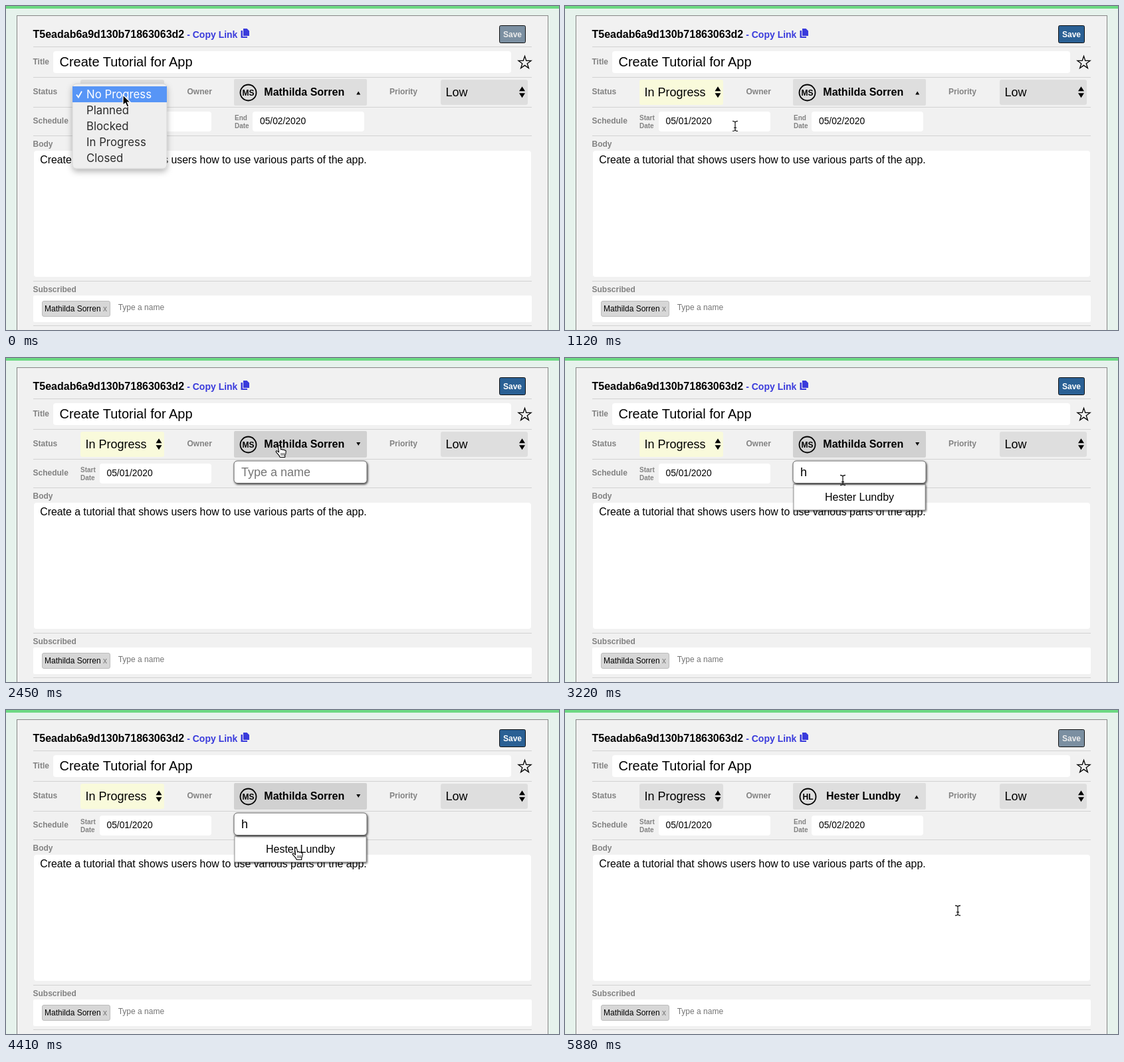
These frames come from a looping animation (832 by 488 pixels, 5950 ms). An HTML page:

```html
<!DOCTYPE html>
<html lang="en">
<head>
<meta charset="utf-8">
<title>Task form</title>
<style>
  html, body { margin: 0; width: 832px; height: 488px; overflow: hidden; }
  svg { display: block; font-family: "Liberation Sans", Arial, Helvetica, sans-serif; }
  text { white-space: pre; }
  .label { font-weight: bold; font-size: 12px; fill: #828282; }
  .small { font-weight: bold; font-size: 10px; fill: #828282; }
  .bold { font-weight: bold; }
  .hint { fill: #757575; }
  .menu text { font: 16.8px Inter, Roboto, sans-serif; }
</style>
</head>
<body>
<svg id="stage" width="832" height="488" viewBox="0 0 832 488"></svg>
<script>
const LOOP = 5950, STEP = 70;
const OLD_OWNER = "Mathilda Sorren", NEW_OWNER = "Hester Lundby";
const OPTIONS = ["No Progress", "Planned", "Blocked", "In Progress", "Closed"];
const GREY = "#dedede", HOVER = "#d1d1d1", EDITED = "#f9fadb";

// Moments at which the interface switches state
const AT = { pickStatus: 840, openOwner: 2240, type: 3080, pickOwner: 4480, saved: 5320 };

// Pointer stops: time, x, y
const PATH = [
  [70, 176, 134], [560, 169, 212], [910, 169, 212], [1400, 390, 133],
  [1680, 390, 133], [2030, 411, 132], [2520, 411, 132], [2800, 418, 184],
  [4080, 418, 184], [4340, 436, 208], [4500, 436, 208], [5040, 762, 41],
  [5670, 762, 41], [5880, 591, 302]
];

const rect = (x, y, w, h, fill, more = "") =>
  `<rect x="${x}" y="${y}" width="${w}" height="${h}" fill="${fill}" ${more}/>`;
const text = (x, y, size, str, more = "") =>
  `<text x="${x}" y="${y}" font-size="${size}" ${more}>${str}</text>`;
const label = (x, y, str, cls = "label") => `<text x="${x}" y="${y}" class="${cls}">${str}</text>`;
const path = (d, more = "") => `<path d="${d}" ${more}/>`;
const group = (id, body, more = "") => `<g id="${id}" ${more}>${body}</g>`;
const divider = y => rect(41, y, 750, 1, "#d2d2d2");
const field = (x, y, w, h) => rect(x, y, w, h, "#fff", 'rx="4"');
const arrows = x => path(`M${x - 4.5} 128.3l4.5-7 4.5 7zM${x - 4.5} 131.3l4.5 7 4.5-7z`);

function starPath(cx, cy, outer) {
  const points = Array.from({ length: 10 }, (_, i) => {
    const r = i % 2 ? outer * 0.39 : outer, a = i * Math.PI / 5;
    return `${(cx + r * Math.sin(a)).toFixed(2)} ${(cy - r * Math.cos(a)).toFixed(2)}`;
  });
  return `M${points.join("L")}Z`;
}

const owner = (id, initials, name, cx, nameX) => group(id,
  `<circle cx="${cx}" cy="130.5" r="12" fill="none" stroke="#000" stroke-width="1.8"/>` +
  text(cx, 135, 12, initials, 'class="bold" text-anchor="middle"') +
  text(nameX, 135.3, 16, name, 'class="bold"'));

const page = [
  rect(0, 0, 832, 488, "#e6f2ec"),
  rect(0, 0, 832, 4, "#6cd983"),
  rect(16.5, 14.5, 799, 490, "#f1f1f1", 'stroke="#868686"'),
  [61, 107, 152, 195, 414, 481].map(divider).join(""),

  text(40.5, 48, 16, "T5eadab6a9d130b71863063d2", 'class="bold"'),
  text(272.2, 48, 14, "- Copy Link", 'class="bold" fill="#3a3bdc"'),
  path("M357 34h5.5l3.5 3.5V45h-9zM353.5 37h2.5v9h7v2h-9.5z", 'fill="#3a3bdc"'),
  group("save", rect(742.5, 29.5, 39, 26, "#7b8fa1", 'id="saveBox" rx="2"') +
    text(762, 47, 12, "Save", 'id="saveText" class="bold" text-anchor="middle"')),

  label(40.5, 88, "Title"), field(71, 68, 689, 33),
  text(80.5, 91, 20, "Create Tutorial for App"),
  path(starPath(780.5, 85.5, 10), 'fill="none" stroke="#000" stroke-width="1.3"'),

  label(40.5, 133, "Status"),
  rect(112, 111, 126, 38, GREY, 'id="statusBox" rx="3"'),
  text(119.5, 136, 18, "No Progress", 'id="statusText"'), arrows(230),
  label(272.5, 133, "Owner"),
  rect(343, 110, 200, 40, GREY, 'id="ownerBox" rx="2"'),
  owner("oldOwner", "MS", OLD_OWNER, 364.5, 388.3),
  owner("newOwner", "HL", NEW_OWNER, 365.5, 393),
  path("", 'id="caret"'),
  label(577, 133, "Priority"),
  rect(654, 111, 131, 38, GREY, 'rx="3"'), text(661.5, 136, 18, "Low"), arrows(776.5),

  label(40.5, 177, "Schedule"),
  label(112, 172, "Start", "small"), label(112, 184, "Date", "small"),
  field(141, 159, 168, 30), text(151.5, 178, 13.8, "05/01/2020"),
  label(344, 172, "End", "small"), label(344, 184, "Date", "small"),
  field(371, 159, 168, 30), text(382, 178, 13.8, "05/02/2020"),

  label(40.5, 212, "Body"), field(42, 218, 748, 190),
  text(51.2, 237, 15.85, "Create a tutorial that shows users how to use various parts of the app."),

  label(40.5, 431, "Subscribed"), rect(41, 436, 750, 40, "#fff", 'rx="2"'),
  rect(54.5, 444.5, 102, 23, "#d7d7d7", 'rx="2.5" stroke="#bcbcbc"'),
  text(58, 460, 12, OLD_OWNER), text(146, 460, 12, "x", 'fill="#777"'),
  text(168.7, 458, 12, "Type a name", 'class="hint"')
].join("");

const statusMenu = group("menu",
  rect(100, 117, 142, 128, "#eeeeee", 'rx="6" filter="url(#menuShadow)" stroke="#c4c4c4" stroke-width=".6"') +
  rect(100, 121, 142, 24, "#5795f6", 'id="highlight"') +
  path("M106 133.5l3 4 5-9", 'id="check" fill="none" stroke-width="1.8"') +
  OPTIONS.map((name, i) => text(121, 139 + 24 * i, 16.8, name, 'class="option"')).join(""),
  'class="menu"');

const results = group("results",
  rect(344, 190, 198, 39, "#fff", 'filter="url(#popupShadow)" stroke="#777" stroke-width=".7"') +
  text(443, 215, 16, NEW_OWNER, 'text-anchor="middle"'));
const popup = group("popup", results +
  rect(343, 155, 200, 33.5, "#fff", 'rx="5" filter="url(#popupShadow)" stroke="#666" stroke-width="1"') +
  text(354, 178, 18, "", 'id="query"'));

const cursors = group("pointer",
  group("arrow", path("M0 0V15.5L3.6 12.2 6.2 18 9 16.8 6.5 11.2H11.4Z", 'fill="#000" stroke="#fff" stroke-width="1.2"')) +
  group("hand", path("M-1.5 1C-1.5-.8 1.2-.8 1.6 1L2.7 6.2C3.3 5 5.3 5.2 5.6 6.6 6.4 5.6 8 6 8.2 7.2 9.2 6.6 10.3 7.3 10.2 8.6 10.2 11.5 9.7 13.5 8.7 15V17.5H1.2C.6 14.7-2.2 12.8-4.6 9.7-5.4 8.2-3.8 7.2-2.5 8.3L-.4 10Z",
    'fill="#fff" stroke="#000" stroke-width="1.1" stroke-linejoin="round"') +
    path("M3 11v4M5.2 11v4M7.4 11v4", 'stroke="#000" stroke-width=".8"')) +
  group("ibeam", path("M-4-7.5Q0-7.5 0-5Q0-7.5 4-7.5M0-5V5M-4 7.5Q0 7.5 0 5Q0 7.5 4 7.5M-2 2.5H2", 'fill="none" stroke="#222" stroke-width="1.3"')));

const filters = `<defs>
  <filter id="menuShadow" x="-20%" y="-20%" width="140%" height="150%"><feDropShadow dx="0" dy="4" stdDeviation="5" flood-opacity=".3"/></filter>
  <filter id="popupShadow" x="-10%" y="-30%" width="120%" height="180%"><feDropShadow dx="1" dy="1.5" stdDeviation="1.8" flood-opacity=".75"/></filter>
</defs>`;

const stage = document.getElementById("stage");
stage.innerHTML = filters + page + popup + statusMenu + cursors;

const el = id => document.getElementById(id);
const show = (id, on) => el(id).setAttribute("display", on ? "inline" : "none");
const set = (id, attrs) => Object.entries(attrs).forEach(([k, v]) => el(id).setAttribute(k, v));
const options = [...document.querySelectorAll(".option")];

function pointerAt(t) {
  if (t <= PATH[0][0]) return PATH[0].slice(1);
  const next = PATH.findIndex(p => p[0] >= t);
  if (next < 0) return PATH[PATH.length - 1].slice(1);
  const [t0, x0, y0] = PATH[next - 1], [t1, x1, y1] = PATH[next];
  const u = (t - t0) / (t1 - t0), e = u * u * (3 - 2 * u);
  return [x0 + (x1 - x0) * e, y0 + (y1 - y0) * e];
}

const inside = (x, y, l, t, r, b) => x >= l && x <= r && y >= t && y <= b;

function pointerKind(x, y, s) {
  if (s.menu) return "arrow";
  if (s.overOwner || s.overSave) return "hand";
  if (s.popup && inside(x, y, 343, 155, 543, 189)) return "ibeam";
  if (s.results && inside(x, y, 344, 190, 542, 229)) return "hand";
  const overText = inside(x, y, 71, 68, 760, 101) || inside(x, y, 42, 218, 790, 408) ||
    inside(x, y, 141, 159, 309, 189) || inside(x, y, 371, 159, 539, 189);
  return overText ? "ibeam" : "arrow";
}

function render(time) {
  const t = Math.floor((time % LOOP) / STEP) * STEP;
  const [x, y] = pointerAt(t);
  const picked = t >= AT.pickStatus, reassigned = t >= AT.pickOwner, saved = t >= AT.saved;
  const s = {
    menu: !picked,
    popup: t >= AT.openOwner && !reassigned,
    results: t >= AT.type && !reassigned,
    overOwner: picked && inside(x, y, 343, 110, 543, 150),
    overSave: picked && inside(x, y, 742, 30, 782, 56)
  };
  const dirty = picked && !saved;

  show("menu", s.menu);
  const row = Math.max(0, Math.min(4, Math.floor((y - 121) / 24)));
  set("highlight", { y: 121 + 24 * row });
  options.forEach((o, i) => o.setAttribute("fill", i === row ? "#fff" : "#2c2c2c"));
  set("check", { stroke: row ? "#2c2c2c" : "#fff" });

  el("statusText").textContent = OPTIONS[picked ? 3 : 0];
  set("statusBox", { fill: dirty ? EDITED : GREY });

  const ownerFill = reassigned && !saved ? EDITED : s.popup || s.overOwner ? HOVER : GREY;
  set("ownerBox", { fill: ownerFill });
  show("oldOwner", !reassigned);
  show("newOwner", reassigned);
  const cx = reassigned ? 529 : 530.2;
  set("caret", { d: s.popup ? `M${cx - 3} 127h6l-3 5z` : `M${cx - 3} 133.5h6l-3-5z` });

  show("popup", s.popup);
  show("results", s.results);
  el("query").textContent = s.results ? "h" : "Type a name";
  set("query", { fill: s.results ? "#000" : "#757575" });

  set("saveBox", { fill: dirty ? "#2a6094" : "#7b8fa1", stroke: dirty && s.overSave ? "#f1f1f1" : "#111" });
  set("saveText", { fill: dirty ? "#fff" : "#ececec" });

  const kind = pointerKind(x, y, s);
  ["arrow", "hand", "ibeam"].forEach(k => show(k, k === kind));
  set("pointer", { transform: `translate(${x.toFixed(1)} ${y.toFixed(1)})` });
}

const start = performance.now();
function tick() {
  render(performance.now() - start);
  requestAnimationFrame(tick);
}
tick();
</script>
</body>
</html>
```
